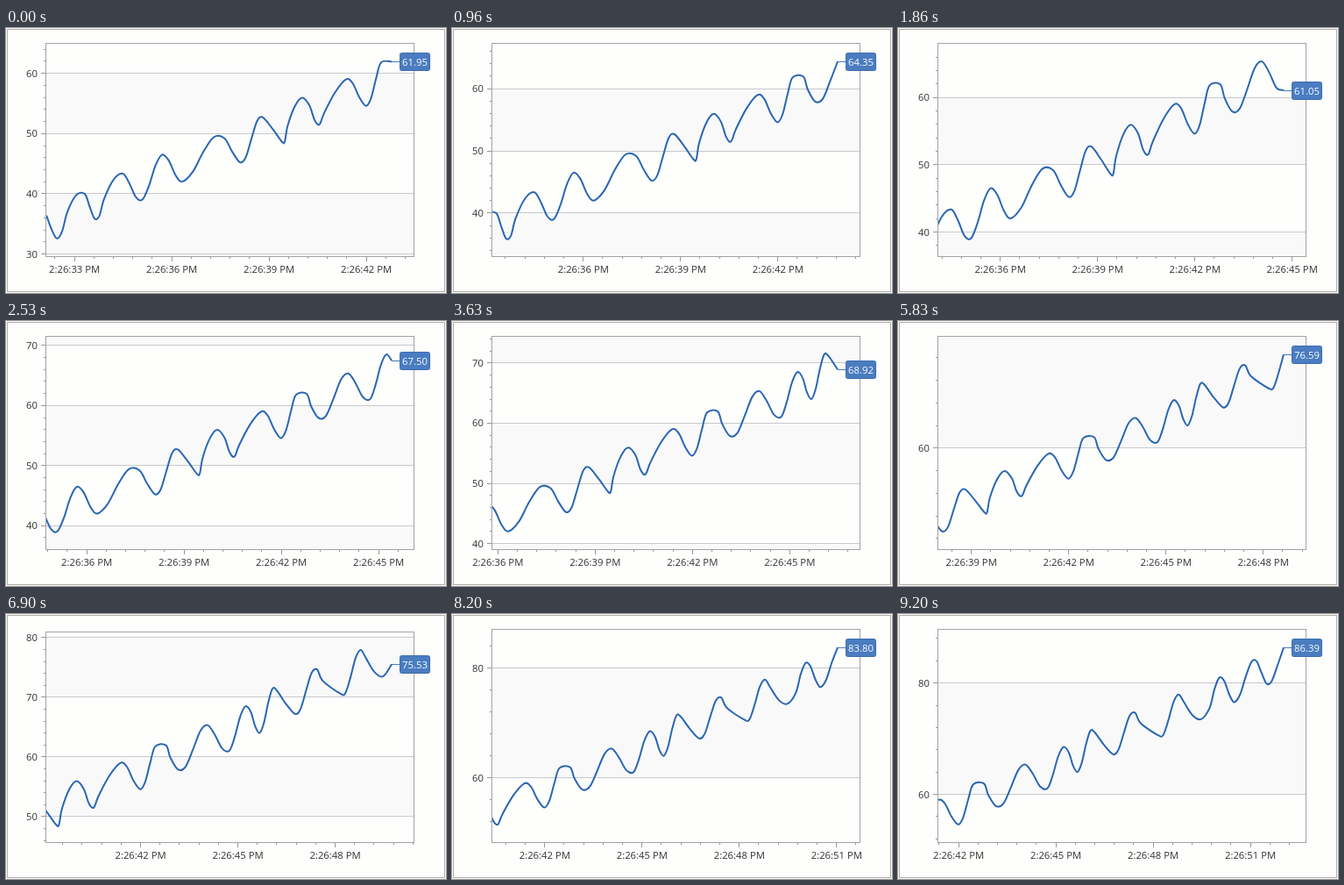
Recreate the animation shown at these times as an HTML page with a canvas. Size 502 by 302 pixels, loop 9300 ms.

```html
<!DOCTYPE html>
<html>
<head>
<meta charset="utf-8">
<style>
html, body { margin: 0; width: 502px; height: 302px; overflow: hidden; background: #fefefd; }
canvas { display: block; }
</style>
</head>
<body>
<canvas id="chart" width="502" height="302"></canvas>
<script>
const ctx = document.getElementById('chart').getContext('2d');
const LOOP = 9300;
const LEFT = 46, RIGHT = 465, TOP = 18, BOTTOM = 260;
const HEAD_X = 440, PX_PER_SEC = 37, PAD = 0.1 / 1.2;
const FIRST = 59, START = 109, LAST = 158;
const GRAY = '#999', INK = '#333';

// A wave on a rising line, one value per sample.
const valueOf = i => 5 + 0.5 * i + 3 * Math.sin(i);

// Samples arrive unevenly: [sample, arrival in ms of the loop], even in between.
const arrivals = [
  [59, -10830], [63, -10180], [65, -9640], [69, -9040], [71, -8460], [77, -7240],
  [80, -6620], [84, -5300], [86, -4820], [90, -4110], [92, -3520], [94, -3340],
  [97, -2660], [100, -2200], [102, -1530], [105, -910], [108, -440], [109, -110],
  [110, 30], [114, 960], [118, 1860], [122, 2530], [128, 3330], [130, 3900],
  [135, 4760], [136, 5300], [141, 6100], [144, 6900], [149, 7660], [152, 8200],
  [156, 8830], [158, 9200]
];

function arrivalOf(i) {
  const k = arrivals.findIndex(key => key[0] >= i);
  const [i1, t1] = arrivals[k];
  if (i1 === i) return t1;
  const [i0, t0] = arrivals[k - 1];
  return t0 + (t1 - t0) * (i - i0) / (i1 - i0);
}

// Seconds after 2:26:30, as shown on the time axis.
const clockAt = ms => 12.89 + 0.000993 * ms;

const samples = [];
for (let i = FIRST; i <= LAST; i++) {
  const ms = arrivalOf(i);
  samples.push({ ms, s: clockAt(ms), v: valueOf(i) });
}

const crisp = v => Math.floor(v) + 0.5;

function line(x0, y0, x1, y1, color) {
  ctx.strokeStyle = color;
  ctx.lineWidth = 1;
  ctx.beginPath();
  ctx.moveTo(x0, y0);
  ctx.lineTo(x1, y1);
  ctx.stroke();
}

function box(x0, y0, x1, y1, color) {
  ctx.strokeStyle = color;
  ctx.lineWidth = 1;
  ctx.strokeRect(x0 + 0.5, y0 + 0.5, x1 - x0, y1 - y0);
}

function text(label, x, y, align, color) {
  ctx.fillStyle = color;
  ctx.textAlign = align;
  ctx.fillText(label, x, y);
}

// Catmull-Rom spline as Bezier pieces.
function spline(pts) {
  const at = i => pts[Math.max(0, Math.min(i, pts.length - 1))];
  const handle = (i, axis) => (at(i + 1)[axis] - at(i - 1)[axis]) / 6;
  ctx.beginPath();
  ctx.moveTo(...pts[0]);
  for (let i = 1; i < pts.length; i++) {
    const [x0, y0] = pts[i - 1], [x1, y1] = pts[i];
    ctx.bezierCurveTo(x0 + handle(i - 1, 0), y0 + handle(i - 1, 1),
      x1 - handle(i, 0), y1 - handle(i, 1), x1, y1);
  }
  ctx.stroke();
}

function draw(shown) {
  const head = shown[shown.length - 1];
  const xOf = s => HEAD_X + (s - head.s) * PX_PER_SEC;
  const visible = shown.filter(p => xOf(p.s) >= LEFT).map(p => p.v);
  const low = Math.min(...visible), high = Math.max(...visible);
  const span = (high - low) * 1.2;
  const min = low - span * PAD, max = high + span * PAD;
  const step = span > 37.5 ? 20 : 10;

  // The plot gives way when its highest label would stick out.
  const topTick = Math.floor(max / step) * step;
  const tickY = TOP + (max - topTick) / span * (BOTTOM - TOP);
  const top = TOP + Math.round(Math.max(0, 27 - tickY));
  const yOf = v => BOTTOM - (v - min) / span * (BOTTOM - top);

  ctx.fillStyle = '#fefefd';
  ctx.fillRect(0, 0, 502, 302);
  box(1, 1, 500, 300, '#aeaaa5');
  ctx.font = '11.3px "Open Sans", "Noto Sans", sans-serif';

  for (let k = Math.floor(min / step); k * step < max; k++) {
    if (k % 2 === 0) continue;
    const y0 = Math.max(top, yOf((k + 1) * step)), y1 = Math.min(BOTTOM, yOf(k * step));
    ctx.fillStyle = '#f9f9f9';
    ctx.fillRect(LEFT, y0, RIGHT - LEFT, y1 - y0);
  }

  const minor = step / 5;
  for (let k = Math.ceil(min / minor); k * minor <= max; k++) {
    const v = k * minor, y = yOf(v), major = k % 5 === 0;
    line(major ? 40 : 43, crisp(y), LEFT, crisp(y), GRAY);
    if (!major) continue;
    line(LEFT, crisp(y), RIGHT, crisp(y), '#c7c9cd');
    text(String(v), 36, Math.round(y) + 4, 'right', INK);
  }

  for (let k = Math.ceil((head.s - 11) / 0.6); k * 0.6 < head.s + 1; k++) {
    const x = xOf(k * 0.6), major = k % 5 === 0;
    if (x < LEFT || x > RIGHT) continue;
    line(crisp(x), BOTTOM, crisp(x), BOTTOM + (major ? 6 : 3), GRAY);
    if (major) text('2:26:' + Math.round(30 + k * 0.6) + ' PM', x, 279, 'center', INK);
  }

  box(LEFT - 1, top - 1, RIGHT, BOTTOM, '#a3a3a6');

  ctx.save();
  ctx.beginPath();
  ctx.rect(LEFT, top, RIGHT - LEFT, BOTTOM - top);
  ctx.clip();
  ctx.strokeStyle = '#2a66b1';
  ctx.lineWidth = 2;
  ctx.lineJoin = 'round';
  spline(shown.map(p => [xOf(p.s), yOf(p.v)]));
  ctx.restore();

  const y = Math.round(yOf(head.v));
  line(HEAD_X, y + 0.5, 450, y + 0.5, '#4a7bbd');
  ctx.fillStyle = '#4a7cc0';
  ctx.strokeStyle = '#3f6eb0';
  ctx.beginPath();
  ctx.roundRect(449.5, y - 9.5, 34, 20, 2);
  ctx.fill();
  ctx.stroke();
  text(head.v.toFixed(2), 466.5, y + 5, 'center', '#fff');
}

function frame() {
  const t = performance.now() % LOOP;
  draw(samples.filter(p => p.ms <= t));
  requestAnimationFrame(frame);
}
frame();
</script>
</body>
</html>
```
